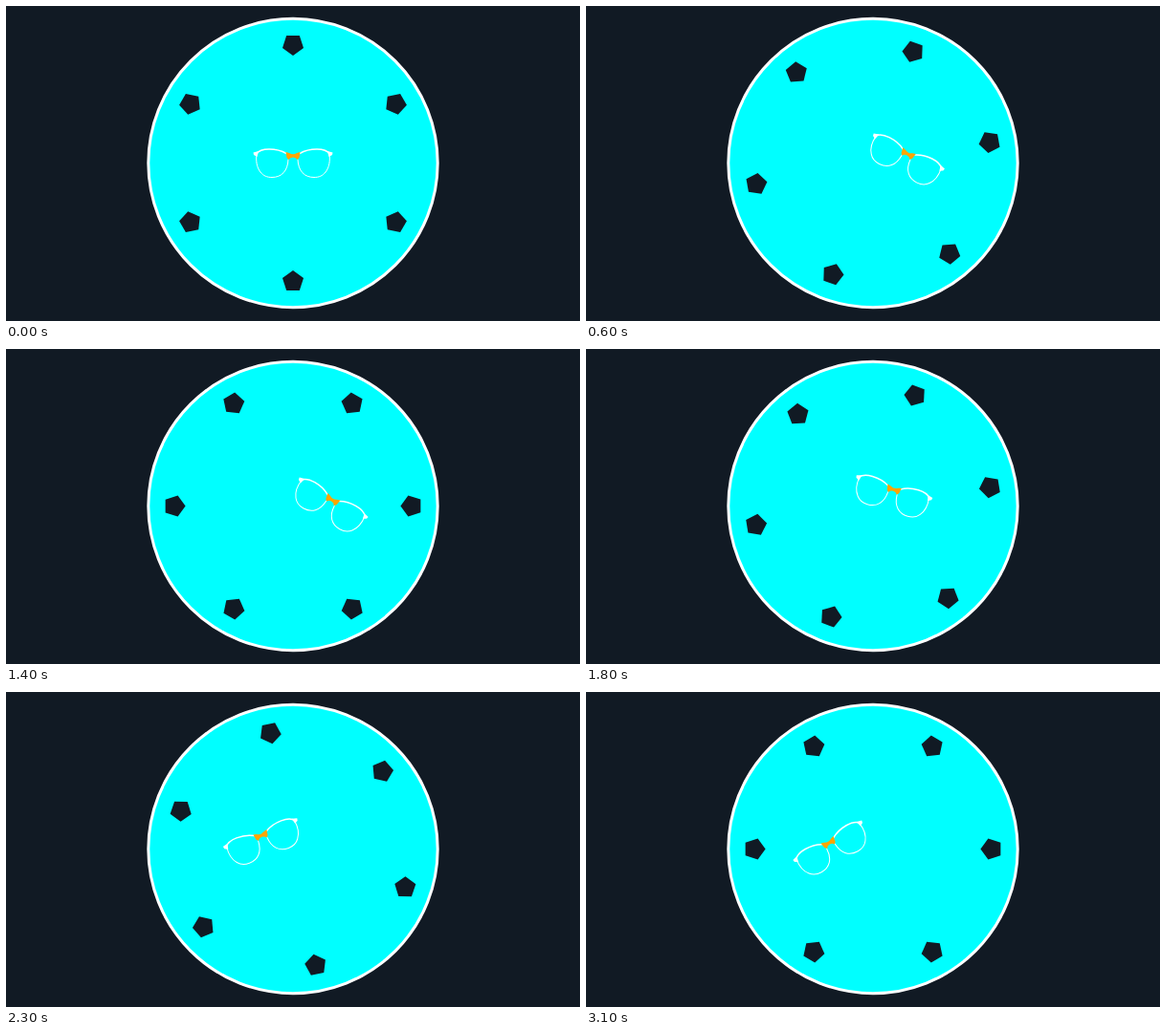
Recreate the animation shown at these times as an HTML page. Size 600 by 330 pixels, loop 3200 ms.

```html
<!DOCTYPE html>
<html lang="en">
<head>
<meta charset="utf-8">
<title>Swinging glasses</title>
<style>
  html, body { margin: 0; width: 100%; height: 100%; overflow: hidden; background: #111a24; }
  svg { display: block; width: 600px; height: 330px; }
</style>
</head>
<body>
<svg viewBox="0 0 600 330">
  <defs>
    <polygon id="pentagon" fill="#111a24"/>
    <g id="lens" fill="none" stroke="#fff" stroke-linecap="round">
      <path stroke-width="1" d="M-38-2C-39 5-38 12-34 17C-31 21-27 22.5-22 22.5C-12 22.5-5.5 16-5 4"/>
      <path stroke-width="1.5" d="M-38.5-2C-36-5.5-31-7-25-7C-18-7-12-5.5-7-2.5"/>
      <path fill="#fff" stroke="none" d="M-41.5-3.5L-36-5L-37.5 1L-41-1Z"/>
    </g>
  </defs>
  <circle cx="300" cy="164.5" r="151.2" fill="#0ff" stroke="#fff" stroke-width="3"/>
  <g id="ring"></g>
  <g id="glasses">
    <use href="#lens"/>
    <use href="#lens" transform="scale(-1 1)"/>
    <path fill="#ffa500" d="M-7.5-4L-4-3Q0-.5 4-3L7.5-4L6.5 2L4.5 4Q3 1.5 0 1.5T-4.5 4L-6.5 2Z"/>
  </g>
</svg>
<script>
const LOOP = 3200, STEP = 100, SWING_BACK = 1375;
const ring = document.getElementById('ring');
const glasses = document.getElementById('glasses');

// Six pentagons, each with one corner towards the centre
const corners = Array.from({ length: 5 }, (_, i) => {
  const a = Math.PI / 2 + i * Math.PI * 2 / 5;
  return [11.6 * Math.cos(a), 11.6 * Math.sin(a)];
});
document.getElementById('pentagon').setAttribute('points', corners.join(' '));
ring.innerHTML = Array.from({ length: 6 }, (_, i) =>
  `<use href="#pentagon" transform="rotate(${i * 60}) translate(0 -124)"/>`).join('');

const mix = (a, b, p) => a + (b - a) * p;

// Quadratic ease in and out
function progress(t, start, duration) {
  const x = Math.min(1, Math.max(0, (t - start) / duration));
  return x < 0.5 ? 2 * x * x : 1 - 2 * (1 - x) ** 2;
}

function place(el, x, y, angle) {
  el.setAttribute('transform', `translate(${x} ${y}) rotate(${angle})`);
}

// Glasses hop along a shallow arc while tilting
function hop(from, to, p) {
  const lift = 0.72 * Math.abs(to.x - from.x) * p * (1 - p);
  place(glasses, mix(from.x, to.x, p), mix(from.y, to.y, p) - lift, mix(from.angle, to.angle, p));
}

const middle = { x: 300, y: 157, angle: 0 };
const right = { x: 341, y: 158.3, angle: 30 };
const left = { x: 254, y: 158.3, angle: -30 };

function draw(now) {
  const t = Math.floor(now % LOOP / STEP) * STEP;
  const turn = 30 * progress(t, 0, 1020) - 60 * progress(t, SWING_BACK, 1535);
  place(ring, 300, 164.5, turn);
  if (t < SWING_BACK) hop(middle, right, progress(t, 0, 790));
  else hop(right, left, progress(t, SWING_BACK, 1270));
}

function tick() {
  draw(performance.now());
  requestAnimationFrame(tick);
}
tick();
</script>
</body>
</html>
```
